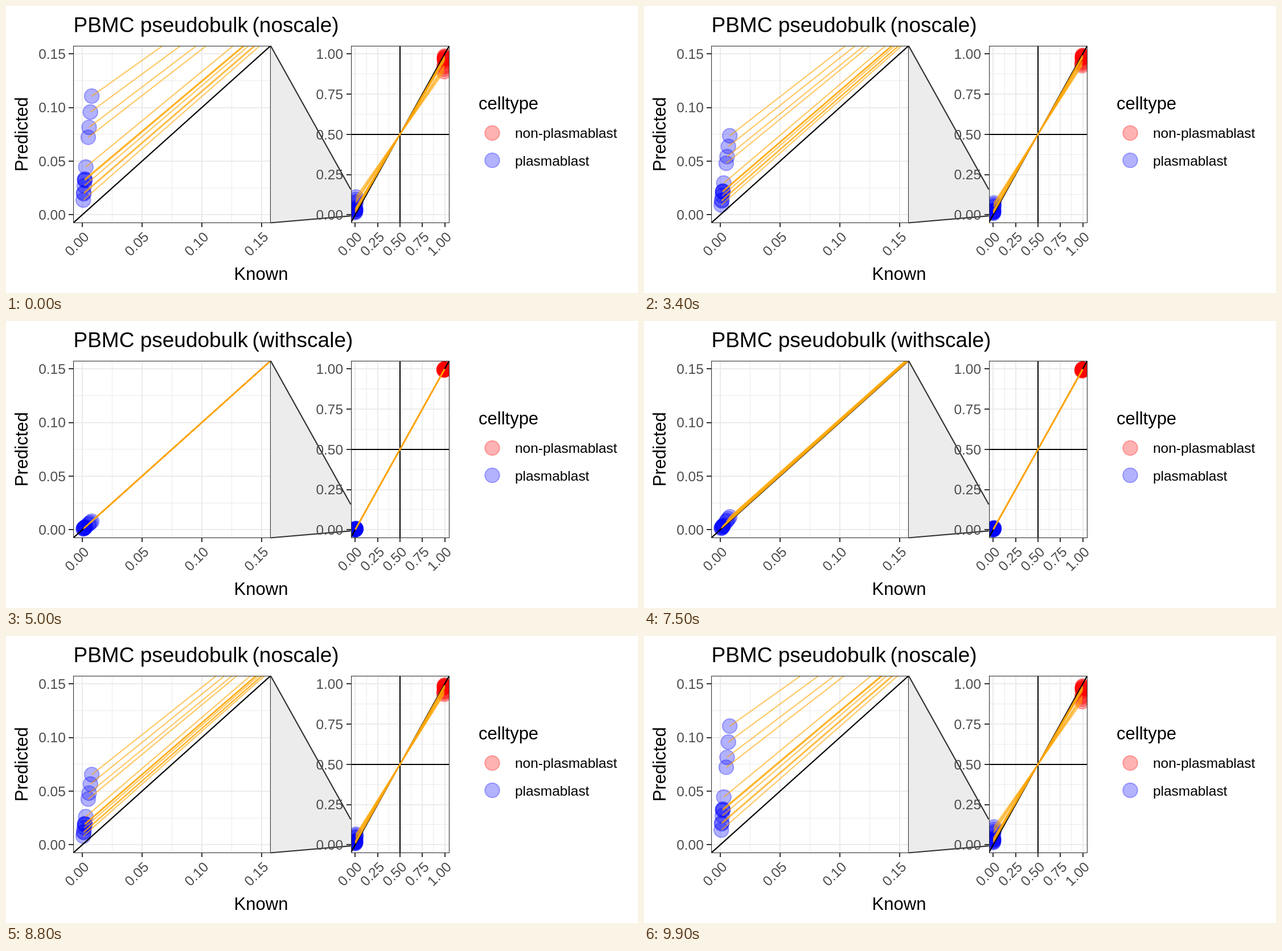
An HTML page with a canvas for the animation above (10 s loop, 1110 px wide and 505 px high).

```html
<!DOCTYPE html>
<html lang="en">
<head>
<meta charset="utf-8">
<title>Pseudobulk scaling</title>
<style>
  html, body { margin: 0; width: 100%; height: 100%; overflow: hidden; background: #fff; }
  canvas { display: block; }
</style>
</head>
<body>
<canvas id="stage" width="1110" height="505"></canvas>
<script>
const ctx = document.getElementById('stage').getContext('2d');
const FONT = '"Liberation Sans", Arial, sans-serif';
const SMALL = 24.44, NORMAL = 31, LARGE = 37;
const LINE = 2.2, TOP = 70, BOTTOM = 381.5;
const RED = 'rgba(255,0,0,0.3)', BLUE = 'rgba(0,0,255,0.3)';
const LOOP = 10000, STEP = 100, STEPS = 25;

// Unscaled predictions; the known fraction follows from each one.
const samples = [0.1106, 0.0957, 0.0815, 0.0722, 0.0445, 0.0333, 0.0327, 0.032,
                 0.027, 0.0205, 0.0195, 0.0137]
  .map(raw => ({ raw, known: 0.0079 * Math.pow(raw / 0.1106, 1.1) }));

function makePanel(left, right, min, max, tick, last) {
  const range = max - min;
  const x0 = Math.round(left), y0 = Math.round(TOP);
  return {
    left, right, min, max, tick, last,
    box: [x0, y0, Math.round(right) - x0, Math.round(BOTTOM) - y0],
    x: v => left + (v - min) / range * (right - left),
    y: v => BOTTOM - (v - min) / range * (BOTTOM - TOP)
  };
}
const zoom = makePanel(118.3, 464.8, -0.0075, 0.1575, 0.05, 0.15);
const full = makePanel(605.5, 778.5, -0.05, 1.05, 0.25, 1);

function line(x1, y1, x2, y2, color, width = LINE) {
  ctx.strokeStyle = color;
  ctx.lineWidth = width;
  ctx.beginPath();
  ctx.moveTo(x1, y1);
  ctx.lineTo(x2, y2);
  ctx.stroke();
}

// Upright and level lines sit on whole pixels.
function vertical(x, y1, y2, color, width = 2) {
  ctx.fillStyle = color;
  ctx.fillRect(Math.round(x - width / 2), y1, width, y2 - y1);
}

function horizontal(y, x1, x2, color, width = 2) {
  ctx.fillStyle = color;
  ctx.fillRect(x1, Math.round(y - width / 2), x2 - x1, width);
}

function text(str, x, y, size, color = '#000', align = 'left', angle = 0, drop = 0) {
  ctx.save();
  ctx.translate(x, y);
  ctx.rotate(angle);
  ctx.font = `${size}px ${FONT}`;
  ctx.fontKerning = 'none';
  ctx.textAlign = align;
  ctx.fillStyle = color;
  ctx.fillText(str, 0, drop);
  ctx.restore();
}

function dot(x, y, color) {
  ctx.beginPath();
  ctx.arc(x, y, 12.84, 0, Math.PI * 2);
  ctx.fillStyle = ctx.strokeStyle = color;
  ctx.lineWidth = 1.97;
  ctx.fill();
  ctx.stroke();
}

function drawGrid(p) {
  const rule = (v, width) => {
    vertical(p.x(v), TOP, BOTTOM, '#ebebeb', width);
    horizontal(p.y(v), p.left, p.right, '#ebebeb', width);
  };
  for (let v = p.tick / 2; v < p.last; v += p.tick) rule(v, 1);
  for (let v = 0; v <= p.last + 0.001; v += p.tick) rule(v, 2);
}

function drawAxes(p) {
  const [left, top, , height] = p.box;
  const bottom = top + height;
  for (let v = 0; v <= p.last + 0.001; v += p.tick) {
    const x = p.x(v), y = p.y(v), label = v.toFixed(2);
    horizontal(y, left - 8, left, '#333');
    vertical(x, bottom, bottom + 7, '#333');
    text(label, p.left - 13.5, Math.round(y + 8.75), SMALL, '#4d4d4d', 'right');
    text(label, x, 394.75, SMALL, '#4d4d4d', 'right', -Math.PI / 4, 18.5);
  }
}

function drawPanel(p, points) {
  ctx.save();
  ctx.beginPath();
  ctx.rect(...p.box);
  ctx.clip();
  ctx.fillStyle = '#fff';
  ctx.fillRect(...p.box);
  drawGrid(p);
  for (const { known, pred } of points) {
    dot(p.x(known), p.y(pred), BLUE);
    dot(p.x(1 - known), p.y(1 - pred), RED);
  }
  line(p.left, BOTTOM, p.right, TOP, '#000');
  vertical(p.x(0.5), TOP, BOTTOM, '#000');
  horizontal(p.y(0.5), p.left, p.right, '#000');
  for (const { known, pred } of points) {
    line(p.x(known), p.y(pred), p.x(1 - known), p.y(1 - pred), 'rgba(255,165,0,0.6)');
  }
  ctx.strokeStyle = '#333';
  ctx.lineWidth = LINE;
  ctx.strokeRect(...p.box);
  ctx.restore();
}

function drawConnector() {
  const upper = full.y(zoom.max), lower = full.y(zoom.min);
  ctx.fillStyle = '#ececec';
  ctx.beginPath();
  ctx.moveTo(zoom.right, TOP);
  ctx.lineTo(full.left, upper);
  ctx.lineTo(full.left, lower);
  ctx.lineTo(zoom.right, BOTTOM);
  ctx.fill();
  line(zoom.right, TOP, full.left, upper, '#333');
  line(zoom.right, BOTTOM, full.left, lower, '#333');
}

function drawLegend() {
  text('celltype', 830, 182, NORMAL);
  dot(854, 223.5, RED);
  dot(854, 271.5, BLUE);
  text('non-plasmablast', 894, 232, SMALL);
  text('plasmablast', 894, 281, SMALL);
}

// Number of steps taken in a transition that begins at the given time.
function stepsSince(t, start) {
  return Math.max(0, Math.min(STEPS, Math.floor((t - start) / STEP) + 1));
}

function draw(t) {
  const scaled = (stepsSince(t, 2600) - stepsSince(t, 7500)) / STEPS;
  const points = samples.map(({ raw, known }) =>
    ({ known, pred: raw + (known - raw) * scaled }));
  const withScale = scaled > 0.5;

  ctx.fillStyle = '#fff';
  ctx.fillRect(0, 0, 1110, 505);
  drawConnector();
  drawAxes(zoom);
  drawAxes(full);
  drawPanel(zoom, points);
  drawPanel(full, points);
  text('PBMC pseudobulk', 118.5, 46, LARGE);
  text(withScale ? '(withscale)' : '(noscale)', 432.5, 46, LARGE);
  text('Known', 448, 482, NORMAL, '#000', 'center');
  text('Predicted', 38, 225.75, NORMAL, '#000', 'center', -Math.PI / 2);
  drawLegend();
}

const begin = performance.now();
function tick() {
  draw((performance.now() - begin) % LOOP);
  requestAnimationFrame(tick);
}
tick();
</script>
</body>
</html>
```
